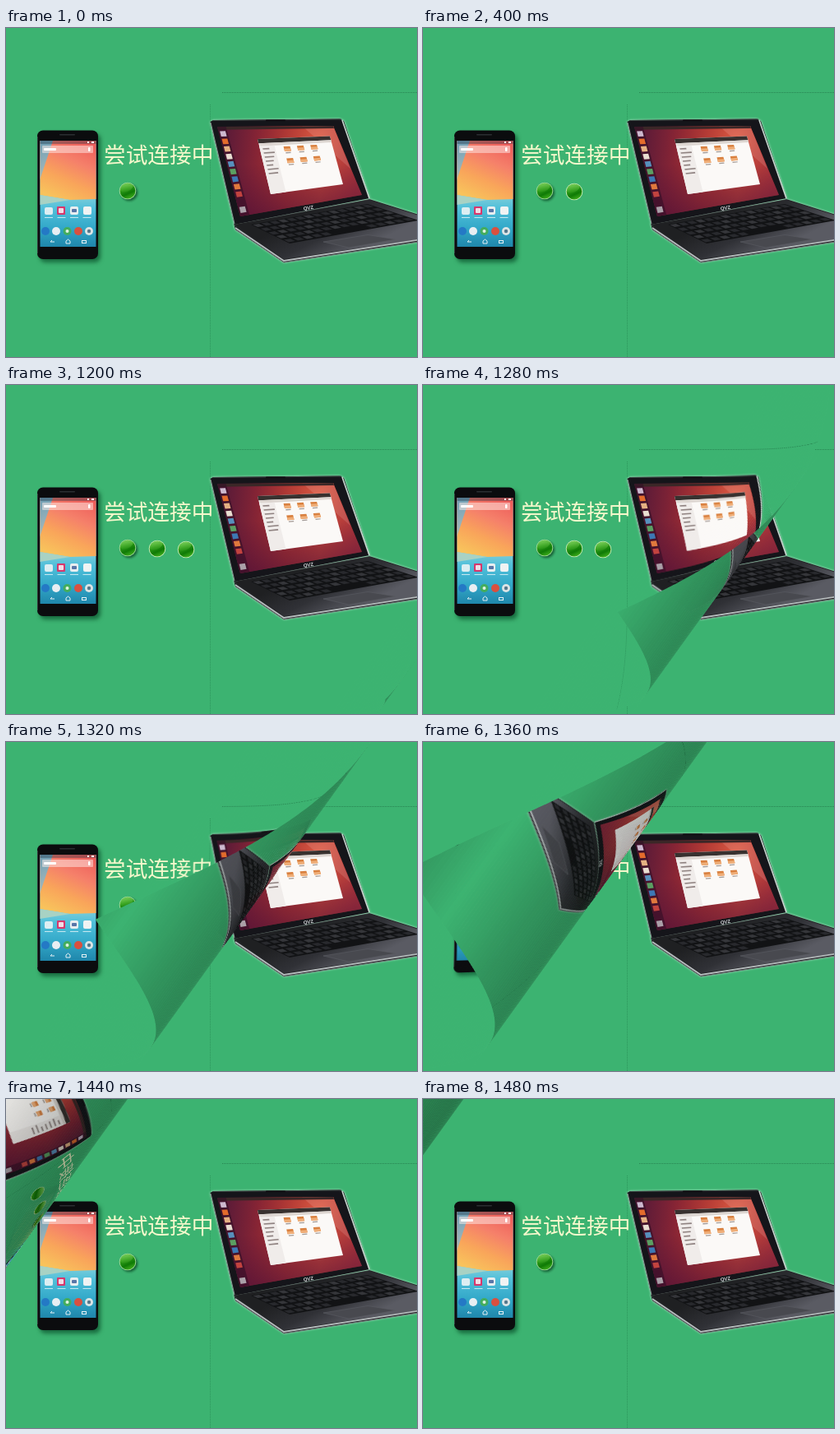
An HTML page with a canvas that plays this animation: 500 by 400 pixels, repeating every 1.5 s.

```html
<!DOCTYPE html>
<html lang="zh">
<head>
<meta charset="utf-8">
<title>尝试连接中</title>
<style>
html, body { margin: 0; width: 100%; height: 100%; overflow: hidden; background: #3cb371; }
canvas { display: block; }
</style>
</head>
<body>
<canvas id="stage" width="500" height="400"></canvas>
<script>
const W = 500, H = 400;
const stage = document.getElementById('stage').getContext('2d');

// ---- drawing helpers ----
function poly(c, pts, fill) {
  c.beginPath();
  pts.forEach(([x, y]) => c.lineTo(x, y));
  c.closePath();
  c.fillStyle = fill;
  c.fill();
}

function line(c, pts, color, width) {
  c.beginPath();
  pts.forEach(([x, y]) => c.lineTo(x, y));
  c.strokeStyle = color;
  c.lineWidth = width;
  c.stroke();
}

function box(c, x, y, w, h, r, fill) {
  c.beginPath();
  c.roundRect(x, y, w, h, r);
  c.fillStyle = fill;
  c.fill();
}

function disc(c, x, y, r, fill) {
  c.beginPath();
  c.arc(x, y, r, 0, Math.PI * 2);
  c.fillStyle = fill;
  c.fill();
}

function ramp(c, x0, y0, x1, y1, ...colors) {
  const g = c.createLinearGradient(x0, y0, x1, y1);
  colors.forEach((col, i) => g.addColorStop(i / (colors.length - 1), col));
  return g;
}

// Point inside a quad given as top left, top right, bottom right, bottom left.
function inQuad(q, u, v) {
  return [0, 1].map(i =>
    (q[0][i] * (1 - u) + q[1][i] * u) * (1 - v) + (q[3][i] * (1 - u) + q[2][i] * u) * v);
}

function cell(q, u0, v0, u1, v1) {
  return [inQuad(q, u0, v0), inQuad(q, u1, v0), inQuad(q, u1, v1), inQuad(q, u0, v1)];
}

// ---- scene ----
function drawPhone(c) {
  c.save();
  c.shadowColor = 'rgba(0,60,30,.6)';
  c.shadowBlur = 5;
  c.shadowOffsetX = 3;
  c.shadowOffsetY = 4;
  box(c, 38, 124.5, 74, 156.5, 7, '#0b0c0e');
  c.restore();
  line(c, [[38.5, 132], [38.5, 274]], '#33383a', 1);
  box(c, 65, 129, 19, 1.5, 1, '#2b2e31');

  c.save();
  c.beginPath();
  c.rect(41.5, 137, 68, 129);
  c.clip();
  c.fillStyle = ramp(c, 0, 195, 0, 266, '#9bd6d8', '#52c0da', '#33a9c9', '#1f86ab');
  c.fillRect(41, 137, 69, 129);
  poly(c, [[41, 137], [110, 137], [110, 208], [78, 209], [41, 203]],
    ramp(c, 98, 140, 66, 210, '#ee5f5c', '#f5806a', '#f9a55a', '#f8c35c'));
  poly(c, [[41, 137], [57, 137], [41, 185]], ramp(c, 41, 137, 50, 180, '#6f9fb5', '#a6b9ba'));
  poly(c, [[41, 203], [78, 209], [41, 215]], '#a8d2c4');
  c.fillStyle = 'rgba(25,45,60,.35)';
  c.fillRect(41, 137, 69, 4);
  c.fillStyle = '#fff';
  c.fillRect(99, 138, 2, 2);
  c.fillRect(104, 138, 3, 2);
  box(c, 44, 143, 62, 9, 1, 'rgba(255,240,235,.5)');
  box(c, 46, 146, 15, 3, 1, '#fff');
  box(c, 100, 145, 2.5, 5, 1, '#fff');

  box(c, 47, 218, 10, 9, 2, '#dceef2');
  box(c, 62, 217, 10, 10, 1, '#d6386d');
  box(c, 64, 219, 6, 6, 1, '#f3dce5');
  box(c, 78, 217, 10, 10, 2, '#e8eef0');
  box(c, 80, 220, 6, 4, 1, '#5876a8');
  box(c, 94, 217, 10, 10, 2, '#f0f3f3');
  c.fillStyle = 'rgba(255,255,255,.7)';
  for (let i = 0; i < 4; i++) c.fillRect(47 + i * 15.5, 230, 10, 1);
  disc(c, 48, 247, 5, '#2479c5');
  disc(c, 61, 247, 5, '#e8eef2');
  disc(c, 74.5, 247, 5, '#43ad5d');
  disc(c, 88, 247, 5, '#d9503f');
  disc(c, 101, 247, 5, '#dce4e5');
  disc(c, 101, 247, 2.2, '#56788d');
  disc(c, 74.5, 247, 2, '#dff2e2');
  c.restore();

  line(c, [[59, 260], [54, 260], [56, 258]], '#e4f1f5', 1);
  line(c, [[73, 262], [73, 259], [75.5, 257], [78, 259], [78, 262], [73, 262]], '#e4f1f5', 1);
  c.strokeRect(92.5, 258.5, 5, 3);
}

function drawLaptop(c) {
  // base
  c.save();
  c.shadowColor = 'rgba(210,245,225,.9)';
  c.shadowBlur = 3;
  poly(c, [[277, 238], [442, 208], [502, 227], [502, 260], [338, 285], [279, 245]], '#222326');
  poly(c, [[248.5, 114], [252, 112], [406, 110.5], [411, 113], [442.5, 207], [278, 239]], '#15151a');
  c.restore();
  poly(c, [[278, 239], [442, 209], [502, 228], [502, 257], [338, 281]],
    ramp(c, 370, 225, 400, 285, '#1f2022', '#303136', '#5a5b63'));

  const keys = [[298, 239], [440, 214], [502, 234], [345, 262]];
  poly(c, keys, '#121315');
  for (let r = 0; r < 5; r++) {
    for (let k = 0; k < 14; k++) {
      if (r === 4 && k > 4 && k < 9) continue;
      poly(c, cell(keys, (k + .14) / 14, (r + .1) / 5, (k + .86) / 14, (r + .72) / 5),
        (k + r) % 3 ? '#28292d' : '#35363a');
    }
  }
  poly(c, [[386, 260], [440, 251.5], [474, 257], [417, 267]], '#48494f');
  line(c, [[386, 260], [440, 251.5], [474, 257], [417, 267], [386, 260]], '#5c5d63', .6);
  line(c, [[279, 243], [338, 283], [502, 257.5]], '#b7bcbe', 1.8);
  line(c, [[279, 245], [338, 285], [502, 260]], '#6b7172', 1);

  // lid
  line(c, [[249, 115], [278, 238]], '#8b9794', 1);
  line(c, [[409, 112], [442, 207]], '#c9dad1', 1.6);
  line(c, [[251, 112.5], [408, 111]], '#3d4644', 1);
  box(c, 316, 111.5, 24, 2, 1, '#101013');

  const screen = [[257, 120], [398, 119], [433, 203], [285, 229]];
  c.save();
  poly(c, screen, ramp(c, 262, 150, 428, 165, '#571a38', '#842435', '#ad3431', '#c4453a', '#a8333c'));
  c.clip();
  const glow = c.createRadialGradient(380, 135, 5, 380, 135, 85);
  glow.addColorStop(0, 'rgba(230,100,70,.6)');
  glow.addColorStop(1, 'rgba(140,30,45,0)');
  c.fillStyle = glow;
  c.fillRect(250, 110, 190, 130);
  c.fillStyle = ramp(c, 0, 165, 0, 225, 'rgba(75,15,55,0)', 'rgba(75,15,55,.6)');
  c.fillRect(250, 165, 190, 75);
  poly(c, [[360, 119], [398, 119], [419, 171]], 'rgba(240,190,180,.18)');
  poly(c, cell(screen, 0, 0, 1, .035), '#3b2727');
  poly(c, cell(screen, 0, 0, .075, 1), 'rgba(50,14,38,.6)');
  c.restore();

  const icons = ['#cdb9cf', '#e36b2c', '#e5b183', '#e9ded2', '#5790bd', '#5b9f62', '#3d78b4', '#e0793d', '#c2433f'];
  icons.forEach((col, i) => {
    const v = .05 + i * .085;
    poly(c, cell(screen, .012, v, .06, v + .06), col);
  });
  poly(c, cell(screen, .01, .9, .058, .965), '#aaa0a8');

  const win = [[306, 135], [394, 131.5], [410, 190], [322, 202]];
  poly(c, win, '#fbf9f7');
  poly(c, cell(win, 0, 0, 1, .08), '#38312f');
  poly(c, cell(win, .01, .08, 1, .13), '#ddd6d1');
  poly(c, cell(win, 0, .13, .21, 1), '#f0ecea');
  for (let i = 0; i < 7; i++) {
    poly(c, cell(win, .04, .17 + i * .075, .13 + (i * 7 % 4) * .02, .195 + i * .075), '#8f8280');
  }
  for (let r = 0; r < 2; r++) {
    for (let k = 0; k < 3; k++) {
      const u = .33 + k * .185, v = .16 + r * .225;
      poly(c, cell(win, u, v, u + .09, v + .09), '#d9803f');
      poly(c, cell(win, u, v + .04, u + .09, v + .09), '#efae78');
      poly(c, cell(win, u + .01, v + .11, u + .08, v + .13), '#a39a96');
    }
  }

  c.save();
  c.translate(368, 219);
  c.rotate(-.18);
  c.font = 'bold 6px Arial, "Liberation Sans", sans-serif';
  c.textAlign = 'center';
  c.textBaseline = 'middle';
  c.fillStyle = '#d8dcde';
  c.fillText('QVZ', 0, 0);
  c.restore();
}

function drawDot(c, x, y, shadow) {
  c.save();
  if (shadow) {
    c.shadowColor = 'rgba(10,70,35,.75)';
    c.shadowBlur = 3;
    c.shadowOffsetX = 2;
    c.shadowOffsetY = 2;
  }
  disc(c, x, y, 10.3, shadow ? '#a5dd9a' : '#cdeeb6');
  c.restore();
  disc(c, x, y, 9.4, ramp(c, x - 4, y - 9, x + 4, y + 9, '#4fb83a', '#2b9a17', '#0f7a06', '#3fae1c'));
  c.save();
  c.beginPath();
  c.arc(x, y, 9.2, 0, Math.PI * 2);
  c.clip();
  c.beginPath();
  c.ellipse(x - 2, y - 5, 9, 6, -.35, 0, Math.PI * 2);
  c.fillStyle = ramp(c, x, y - 10, x, y + 1, 'rgba(170,230,130,.5)', 'rgba(120,210,80,.12)');
  c.fill();
  c.restore();
}

const dots = [[148, 198], [184, 199], [219, 200]];

function makePage(count) {
  const cv = document.createElement('canvas');
  cv.width = W;
  cv.height = H;
  const c = cv.getContext('2d');
  c.fillStyle = '#3cb371';
  c.fillRect(0, 0, W, H);
  c.setLineDash([1, 1]);
  line(c, [[263, 78.5], [W, 78.5]], 'rgba(15,75,42,.45)', 1);
  line(c, [[248.5, 93], [248.5, H]], 'rgba(15,95,52,.35)', 1);
  c.setLineDash([]);
  drawPhone(c);
  drawLaptop(c);
  c.font = '400 26.7px "Noto Sans CJK SC", "Noto Sans CJK", sans-serif';
  c.fillStyle = '#f6f8cc';
  c.fillText('尝试连接中', 119, 164);
  dots.slice(0, count).forEach(([x, y], i) => drawDot(c, x, y, i === 0));
  return cv;
}

const pages = [1, 2, 3].map(makePage);

// ---- page curl ----
// The page rolls over a cylinder: N is normal to its edge, U the pull direction.
const N = [.811, .585], U = [.905, .426];
const DOT = N[0] * U[0] + N[1] * U[1];
const REACH = 640, STEPS = 16, STRIP = 4;

function strip(c, d0, d1) {
  const at = (d, t) => [d * N[0] - t * N[1], d * N[1] + t * N[0]];
  c.beginPath();
  [at(d0, -600), at(d1, -600), at(d1, 600), at(d0, 600)].forEach(p => c.lineTo(...p));
  c.closePath();
}

function drawCurl(c, page, step) {
  const edge = REACH * (1 - (step + 1) / STEPS);
  const R = 7 * Math.sqrt(REACH - edge);
  const start = edge - R;
  const dark = .26 + .14 * (step / 14) ** 2;
  const pull = d => {
    const a = Math.max(0, (d - start) / R);
    return R * (a - Math.sin(a)) / DOT;
  };

  if (start > 0) {
    c.save();
    strip(c, -10, start + .6);
    c.clip();
    c.drawImage(page, 0, 0);
    c.restore();
  }
  for (let d = Math.max(0, start); d < REACH; d += STRIP) {
    const f = pull(d), g = (pull(d + STRIP) - f) / STRIP, o = g * d - f;
    c.save();
    c.transform(1 - g * N[0] * U[0], -g * N[0] * U[1],
      -g * N[1] * U[0], 1 - g * N[1] * U[1], o * U[0], o * U[1]);
    strip(c, d, d + STRIP + .7);
    c.clip();
    c.drawImage(page, 0, 0);
    const angle = (d + STRIP / 2 - start) / R;
    if (angle > Math.PI / 2) {
      c.fillStyle = `rgba(0,10,5,${dark * Math.abs(Math.sin(angle))})`;
      c.fillRect(0, 0, W, H);
    }
    c.restore();
  }
}

function render(t) {
  if (t < 1200) {
    stage.drawImage(pages[Math.floor(t / 400)], 0, 0);
  } else {
    stage.drawImage(pages[0], 0, 0);
    drawCurl(stage, pages[2], Math.min(14, Math.floor((t - 1200) / 20)));
  }
}

const begin = performance.now();
function tick() {
  render((performance.now() - begin) % 1500);
  requestAnimationFrame(tick);
}
tick();
</script>
</body>
</html>
```
